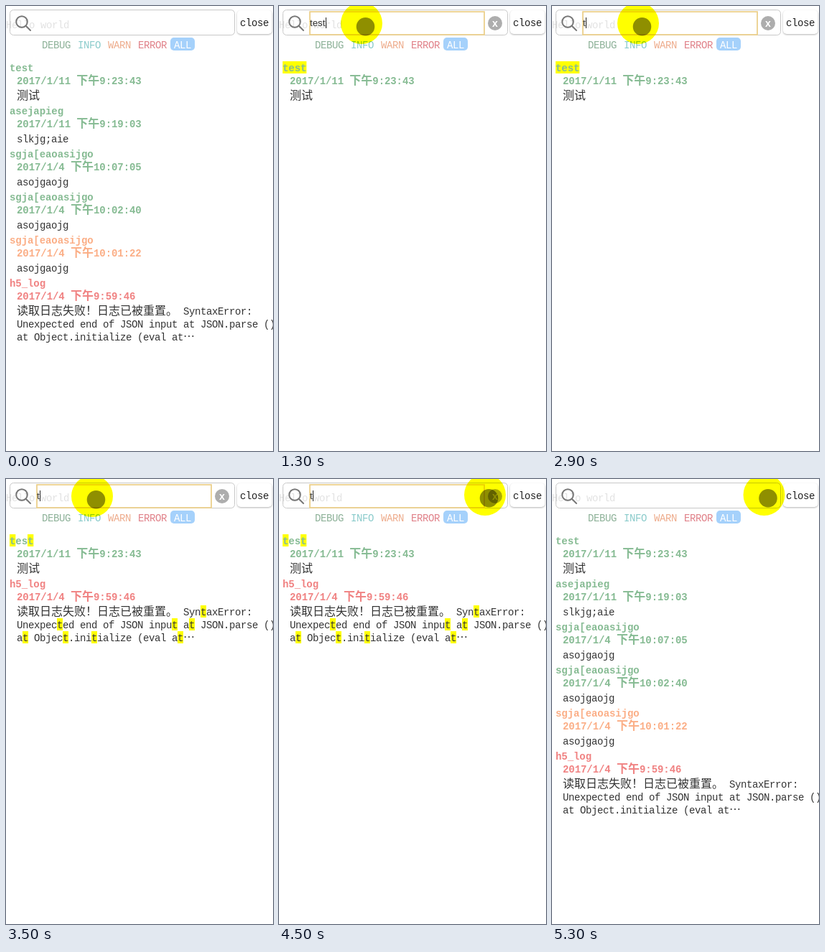
An HTML page for the animation above (5900 ms loop, 372x620 px).

```html
<!DOCTYPE html>
<html lang="zh">
<head>
<meta charset="utf-8">
<title>Log search</title>
<style>
html, body { margin: 0; width: 100%; height: 100%; overflow: hidden; background: #fff; }
svg { display: block; width: 372px; height: 620px; background: #fff; }
text { white-space: pre; }
.mono { font: 14px "Liberation Mono", monospace; letter-spacing: -.4px; }
.cjk { font: 300 16px "Noto Sans CJK SC", "Noto Sans CJK", sans-serif; letter-spacing: 0; }
.bold { font-weight: 700; }
.mono.bold { letter-spacing: -.07px; }
.input { font: 13.33px "Liberation Sans", Arial, sans-serif; fill: #333; }
#close { filter: drop-shadow(0 1px 1.2px rgba(0, 0, 0, .3)); }
#cursor { mix-blend-mode: multiply; }
#touch { filter: blur(.6px); }
</style>
</head>
<body>
<svg id="stage" viewBox="0 0 372 620">
  <g id="page"></g>
  <g id="search">
    <rect x="5.5" y="5.5" width="313" height="35" rx="5" fill="none" stroke="#c8c8c8"/>
    <g fill="none" stroke="#777" stroke-width="2" stroke-linecap="round">
      <circle cx="22" cy="22" r="7.8"/>
      <path d="M28 28L34 34"/>
    </g>
    <rect id="focus" x="43" y="8" width="243" height="32" fill="none" stroke="#ecd08c" stroke-width="1.8"/>
    <text id="query" class="input" x="43" y="28"></text>
    <rect id="caret" y="16" width="1" height="15" fill="#222"/>
    <g id="clear">
      <circle cx="301" cy="24" r="10" fill="#adadad"/>
      <text x="301" y="28.5" text-anchor="middle" fill="#fff" style="font:700 14px 'Liberation Mono',monospace">x</text>
    </g>
    <rect id="close" x="322" y="6" width="48.5" height="33" rx="5" fill="#fff"/>
  </g>
  <g id="tabs"><rect x="229" y="44" width="34" height="18" rx="5" fill="#a5d1fb"/></g>
  <g id="lists"></g>
  <g id="cursor">
    <circle r="29" fill="#ff0"/>
    <circle id="touch" cx="5.5" cy="4.7" r="12.8" fill="#000" fill-opacity=".44"/>
    <circle id="press" cx="1" r="6.5" fill="none" stroke="#c00000" stroke-width="3"/>
  </g>
</svg>
<script>
const LOOP = 5900, STEP = 100;
const GREEN = '#86bb93', ORANGE = '#fbae86', RED = '#f08282';
const $ = id => document.getElementById(id);

function add(parent, tag, attrs, text) {
  const el = document.createElementNS('http://www.w3.org/2000/svg', tag);
  for (const k in attrs) el.setAttribute(k, attrs[k]);
  if (text) el.textContent = text;
  parent.appendChild(el);
  return el;
}

const isWide = c => c > '\u2e7f' || c === '…';

// One line of mixed Latin and CJK text, with search hits marked
function line(parent, x, y, text, fill, bold = false, hit = '') {
  const advance = c => isWide(c) ? 16 : bold ? 8.33 : 8;
  const width = s => [...s].reduce((sum, c) => sum + advance(c), 0);
  if (hit) {
    for (let i = text.indexOf(hit); i >= 0; i = text.indexOf(hit, i + hit.length)) {
      add(parent, 'rect', {
        x: x + width(text.slice(0, i)), y: y - 14,
        width: width(hit), height: 17, fill: '#ff0'
      });
    }
  }
  for (const run of text.match(/[\u2e80-\uffff…]+|[^\u2e80-\uffff…]+/g)) {
    const cls = (isWide(run[0]) ? 'cjk' : 'mono') + (bold ? ' bold' : '');
    add(parent, 'text', { x, y, fill, class: cls }, run);
    x += width(run);
  }
}

const logs = [
  ['test', '2017/1/11 下午9:23:43', GREEN, '测试'],
  ['asejapieg', '2017/1/11 下午9:19:03', GREEN, 'slkjg;aie'],
  ['sgja[eaoasijgo', '2017/1/4 下午10:07:05', GREEN, 'asojgaojg'],
  ['sgja[eaoasijgo', '2017/1/4 下午10:02:40', GREEN, 'asojgaojg'],
  ['sgja[eaoasijgo', '2017/1/4 下午10:01:22', ORANGE, 'asojgaojg'],
  ['h5_log', '2017/1/4 下午9:59:46', RED, '读取日志失败！日志已被重置。 SyntaxError:',
    'Unexpected end of JSON input at JSON.parse ()', 'at Object.initialize (eval at…']
];

function buildList(filter) {
  const g = add($('lists'), 'g', {});
  logs.filter(log => log.join(' ').includes(filter)).forEach(([name, date, color, ...body], i) => {
    const y = 91 + i * 60;
    line(g, 5, y, name, color, true, filter);
    line(g, 15, y + 18, date, color, true, filter);
    body.forEach((s, n) => line(g, 15, y + 39 + n * 18, s, '#333', false, filter));
  });
  return g;
}

const lists = {};
for (const f of ['', 'test', 't']) lists[f] = buildList(f);

line($('page'), 0, 31, 'Hello world', '#e2e2e2');
line($('search'), 326, 28, 'close', '#222');
[[50, 'DEBUG', '#8db198'], [100, 'INFO', '#8acbcb'], [142, 'WARN', '#eeac8c'],
 [184, 'ERROR', '#e08088'], [234, 'ALL', '#fff']]
  .forEach(([x, s, c]) => line($('tabs'), x, 59, s, c));

// Step tables: [start ms, value]
const typed = [[0, ''], [500, 'test'], [2500, 'tes'], [2700, 'te'], [2900, 't'], [5000, '']];
const shown = [[0, ''], [500, 'test'], [3400, 't'], [5100, '']];
const focused = [[0, 0], [1200, 1], [5000, 0]];
const caretOn = [[0, 0], [1200, 1], [2200, 0], [2500, 1], [3900, 0], [4400, 1], [4900, 0]];
const pressed = [[0, 0], [400, 1], [500, 0], [1100, 1], [1200, 0], [4800, 1], [5000, 0]];
const path = [
  [100, 6, 382], [200, 17, 84], [500, 19, 84], [600, 51, 68], [700, 80, 47], [800, 100, 33],
  [900, 112, 26], [1000, 115, 24], [1500, 116, 24], [1600, 118, 24], [1700, 119, 24],
  [1800, 120, 24], [4100, 152, 24], [4200, 198, 24], [4300, 238, 23], [4400, 268, 23],
  [4500, 287, 22], [4600, 295.5, 22]
];

const rowAt = (table, t) => table.filter(row => row[0] <= t).pop();
const at = (table, t) => rowAt(table, t)[1];
const show = (el, on) => { el.style.display = on ? '' : 'none'; };

function render(ms) {
  const t = Math.floor(ms % LOOP / STEP) * STEP;
  const query = at(typed, t), filter = at(shown, t), pos = rowAt(path, t);
  $('query').textContent = query;
  show($('clear'), query);
  show($('focus'), at(focused, t));
  show($('caret'), at(caretOn, t));
  $('caret').setAttribute('x', Math.round(43.4 + $('query').getComputedTextLength()));
  for (const f in lists) show(lists[f], f === filter);
  show($('cursor'), pos);
  show($('press'), at(pressed, t));
  if (pos) $('cursor').setAttribute('transform', `translate(${pos[1]} ${pos[2]})`);
}

const start = performance.now();
function frame() {
  render(performance.now() - start);
  requestAnimationFrame(frame);
}
frame();
</script>
</body>
</html>
```
